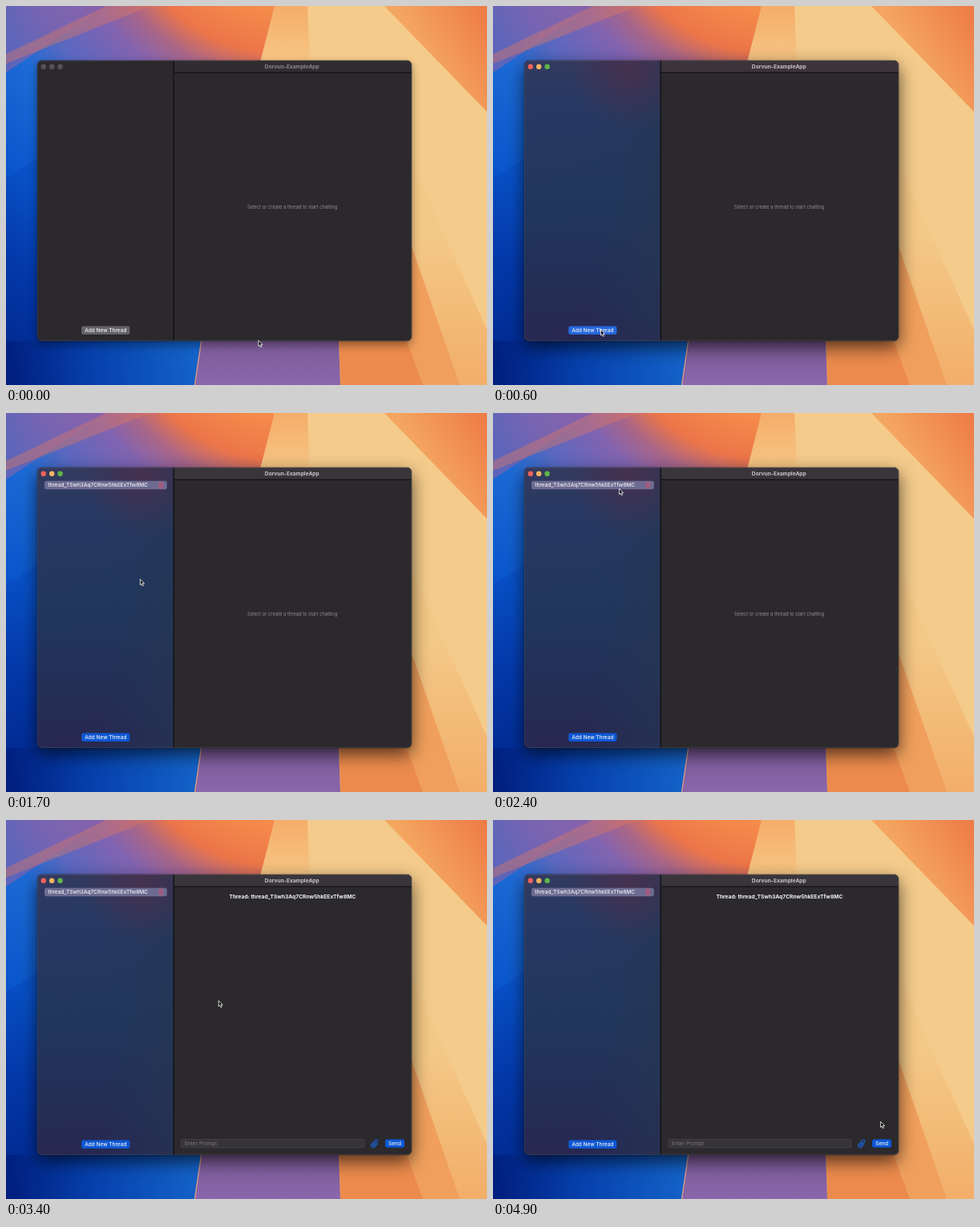
Recreate the animation shown at these times as an HTML page. Size 600 by 473 pixels, loop 5 s.

```html
<!DOCTYPE html>
<html lang="en">
<head>
<meta charset="utf-8">
<title>Thread demo</title>
<style>
  html, body { margin: 0; width: 100%; height: 100%; overflow: hidden; background: #f2c88a; }
  svg { display: block; width: 100%; height: 100%; }
  text { font-family: Inter, "Open Sans", sans-serif; font-size: 6.5px; fill: #f4f4f6; }
  .mid { text-anchor: middle; }
  .bold { font-weight: 700; font-size: 6.65px; }
  .btn { font-weight: 500; }
  #shadow { fill: #1b191c; filter: drop-shadow(0 8px 11px rgba(0, 0, 0, .65)); }
  .idle #shadow { filter: drop-shadow(0 5px 6px rgba(0, 0, 0, .4)); }
</style>
</head>
<body>
<svg id="stage" viewBox="0 0 600 473" preserveAspectRatio="none" xmlns="http://www.w3.org/2000/svg">
  <defs>
    <!-- the rays fan out from a point above the stage -->
    <radialGradient id="fan" cx="350" cy="-150" r="700" gradientUnits="userSpaceOnUse">
      <stop offset=".22" stop-color="#f58c4a"/><stop offset=".3" stop-color="#ec7549"/>
      <stop offset=".35" stop-color="#a96688"/><stop offset=".4" stop-color="#8263b0"/>
      <stop offset=".49" stop-color="#5a68c0"/><stop offset=".56" stop-color="#1d6bd6"/>
      <stop offset=".7" stop-color="#0a56cc"/><stop offset=".82" stop-color="#0538a8"/>
      <stop offset="1" stop-color="#001f80"/>
    </radialGradient>
    <linearGradient id="floor" x1="0" y1="473" x2="240" y2="440" gradientUnits="userSpaceOnUse">
      <stop offset="0" stop-color="#001d7c"/><stop offset=".45" stop-color="#0640ac"/>
      <stop offset="1" stop-color="#1463c8"/>
    </linearGradient>
    <linearGradient id="wedge" x1="0" y1="0" x2="0" y2="68" gradientUnits="userSpaceOnUse">
      <stop offset="0" stop-color="#f5ad69"/><stop offset="1" stop-color="#f6c584"/>
    </linearGradient>
    <linearGradient id="corner" x1="520" y1="60" x2="600" y2="10" gradientUnits="userSpaceOnUse">
      <stop offset="0" stop-color="#f4a660"/><stop offset="1" stop-color="#ee7c46"/>
    </linearGradient>
    <linearGradient id="peach" x1="560" y1="290" x2="560" y2="473" gradientUnits="userSpaceOnUse">
      <stop offset="0" stop-color="#f4c886"/><stop offset="1" stop-color="#f2ae6a"/>
    </linearGradient>
    <linearGradient id="plum" x1="0" y1="418" x2="0" y2="473" gradientUnits="userSpaceOnUse">
      <stop offset="0" stop-color="#7c5b99"/><stop offset="1" stop-color="#8a66aa"/>
    </linearGradient>
    <linearGradient id="side" x1="39" y1="68" x2="60" y2="418" gradientUnits="userSpaceOnUse">
      <stop offset="0" stop-color="#343a5e"/><stop offset=".15" stop-color="#273963"/>
      <stop offset=".55" stop-color="#21365c"/><stop offset="1" stop-color="#272851"/>
    </linearGradient>
    <radialGradient id="blush" cx="170" cy="80" r="75" gradientUnits="userSpaceOnUse">
      <stop offset="0" stop-color="#512d49" stop-opacity=".7"/>
      <stop offset="1" stop-color="#512d49" stop-opacity="0"/>
    </radialGradient>
    <linearGradient id="teal" x1="120" y1="0" x2="209" y2="0" gradientUnits="userSpaceOnUse">
      <stop offset="0" stop-color="#22385a" stop-opacity="0"/>
      <stop offset="1" stop-color="#263652" stop-opacity=".6"/>
    </linearGradient>
    <clipPath id="frame"><rect x="39" y="68" width="467" height="350" rx="6"/></clipPath>
  </defs>

  <g id="wallpaper">
    <path fill="#f4cb8b" d="M0 0H600V473H0z"/>
    <path fill="url(#fan)" d="M0 0H335L235 473H0z"/>
    <path fill="#8a63a8" opacity=".6" d="M0 0H125L0 83z"/>
    <path fill="#e0785c" opacity=".4" d="M125 0H180L0 72V60z"/>
    <path fill="#003fb0" opacity=".25" d="M0 215L39 190V473H0z"/>
    <path fill="url(#floor)" d="M0 418H244L235 473H0z"/>
    <path fill="url(#wedge)" d="M335 0H376L379 70H317z"/>
    <path fill="url(#corner)" d="M472 0H600V132z"/>
    <path fill="url(#peach)" d="M500 182L600 404V473H500z"/>
    <path fill="#f0a05c" d="M470 410L506 300L566 473H470z"/>
    <path fill="#ec8b4d" d="M415 410H497L520 473H417z"/>
    <path fill="url(#plum)" d="M244 415H415L417 473H235z"/>
    <path stroke="#d69a86" stroke-width="1.4" d="M243.6 418L235.5 473"/>
  </g>

  <rect id="shadow" x="39" y="68" width="467" height="350" rx="6"/>
  <g clip-path="url(#frame)">
    <path fill="#2b292c" d="M39 68H506V418H39z"/>
    <g id="tint">
      <path fill="url(#side)" d="M39 68H209V418H39z"/>
      <path fill="url(#teal)" d="M39 68H209V418H39z"/>
      <path fill="url(#blush)" d="M39 68H209V180H39z"/>
    </g>
    <path id="bar" d="M209 68H506V83H209z"/>
    <path fill="#121113" d="M208.5 68H210V418H208.5zM209 82.5H506V83.7H209z"/>
  </g>
  <g fill="none" stroke-width=".6">
    <rect x="38.8" y="67.8" width="467.4" height="350.4" rx="6.2" stroke="#000" stroke-opacity=".45"/>
    <rect x="39.4" y="68.4" width="466.2" height="349.2" rx="5.6" stroke="#8b858b" stroke-opacity=".4"/>
  </g>

  <g id="lights">
    <circle cx="46.8" cy="75.7" r="3.2"/><circle cx="57.2" cy="75.7" r="3.2"/><circle cx="67.6" cy="75.7" r="3.2"/>
  </g>
  <text id="title" class="mid bold" x="356.8" y="77.9">Dorvun-ExampleApp</text>

  <g id="row">
    <rect x="48" y="84.8" width="152.8" height="10.4" rx="2.6" fill="#6d6b92"/>
    <text class="btn" x="52.3" y="92.3">thread_TSwh3Aq7CRnw5hkEExTfw8MC</text>
    <path fill="none" stroke="#d0506a" stroke-width=".8" d="M190.2 87.5H196.4M192 87.4V86.5H194.6V87.4M191 87.8L191.4 93.7H195.2L195.6 87.8M192.5 89V92.5M194.1 89V92.5"/>
  </g>

  <rect id="add" x="94.2" y="399.5" width="60.2" height="10.4" rx="2.4"/>
  <text class="mid btn" x="124.3" y="407">Add New Thread</text>

  <text id="hint" class="mid" x="357.2" y="252.6" style="font-size:5.8px;fill:#918e91">Select or create a thread to start chatting</text>

  <g id="chat">
    <text class="mid bold" x="357.4" y="98">Thread: thread_TSwh3Aq7CRnw5hkEExTfw8MC</text>
    <rect x="218.4" y="398.6" width="228.4" height="10.2" rx="2.2" fill="#363437" stroke="#4b484b" stroke-width=".7"/>
    <text x="223" y="406.2" style="fill:#7c797d">Enter Prompt</text>
    <path fill="none" stroke="#1769e0" stroke-width="1" stroke-linecap="round" stroke-linejoin="round" transform="translate(460 404) rotate(42)" d="M2.6 -2V3A2.5 2.5 0 0 1 -2.4 3V-3.8A1.7 1.7 0 0 1 1 -3.8V2.6A.8 .8 0 0 1 -.7 2.6V-2"/>
    <rect x="473" y="398.6" width="24" height="10.2" rx="2.4" fill="#0e58d4"/>
    <text class="mid btn" x="485" y="406.1">Send</text>
  </g>

  <path id="cursor" fill="#0b0b0c" stroke="#fff" stroke-width=".8" stroke-linejoin="round" d="M.4 .4V7.5L2 6.1L3.2 8.8L4.5 8.2L3.3 5.6H5.5z"/>
</svg>
<script>
const LOOP = 5000, STEP = 100;
const ACTIVE = 500, RELEASE = 800, CREATED = 1300, OPENED = 2700;

// time, x, y of the pointer tip
const PATH = [
  [0, 314.5, 417], [500, 134, 403.5], [1000, 134, 403.5], [1700, 167, 207],
  [2300, 157, 94], [2600, 157, 94], [3400, 264.8, 225], [4100, 323, 121], [4900, 483, 376]
];

const $ = id => document.getElementById(id);
const show = (id, on) => $(id).setAttribute("visibility", on ? "visible" : "hidden");
const fill = (el, color) => el.setAttribute("fill", color);
const ease = p => p * p * (3 - 2 * p);

function pointer(t) {
  const i = Math.max(1, PATH.findIndex(k => k[0] >= t));
  const [t0, x0, y0] = PATH[i - 1], [t1, x1, y1] = PATH[i];
  const p = ease((t - t0) / (t1 - t0));
  return [x0 + (x1 - x0) * p, y0 + (y1 - y0) * p];
}

function draw(t) {
  const active = t >= ACTIVE;
  const pressed = active && t < RELEASE;
  $("stage").classList.toggle("idle", !active);
  show("tint", active);
  show("row", t >= CREATED);
  show("hint", t < OPENED);
  show("chat", t >= OPENED);
  fill($("bar"), !active ? "#302d30" : t < CREATED ? "#3b343b" : "#39353a");
  fill($("add"), !active ? "#656366" : pressed ? "#2668dd" : "#0e58d4");
  $("title").style.fill = active ? "#c9c4c8" : "#8a878a";
  const colors = active ? ["#ef625b", "#f2b463", "#5fb648"] : ["#555255", "#555255", "#555255"];
  [...$("lights").children].forEach((dot, i) => fill(dot, colors[i]));
  $("cursor").setAttribute("transform", `translate(${pointer(t)})`);
}

const start = performance.now();
function tick() {
  const t = (performance.now() - start) % LOOP;
  draw(Math.floor(t / STEP) * STEP);
  requestAnimationFrame(tick);
}
draw(0);
requestAnimationFrame(tick);
</script>
</body>
</html>
```
